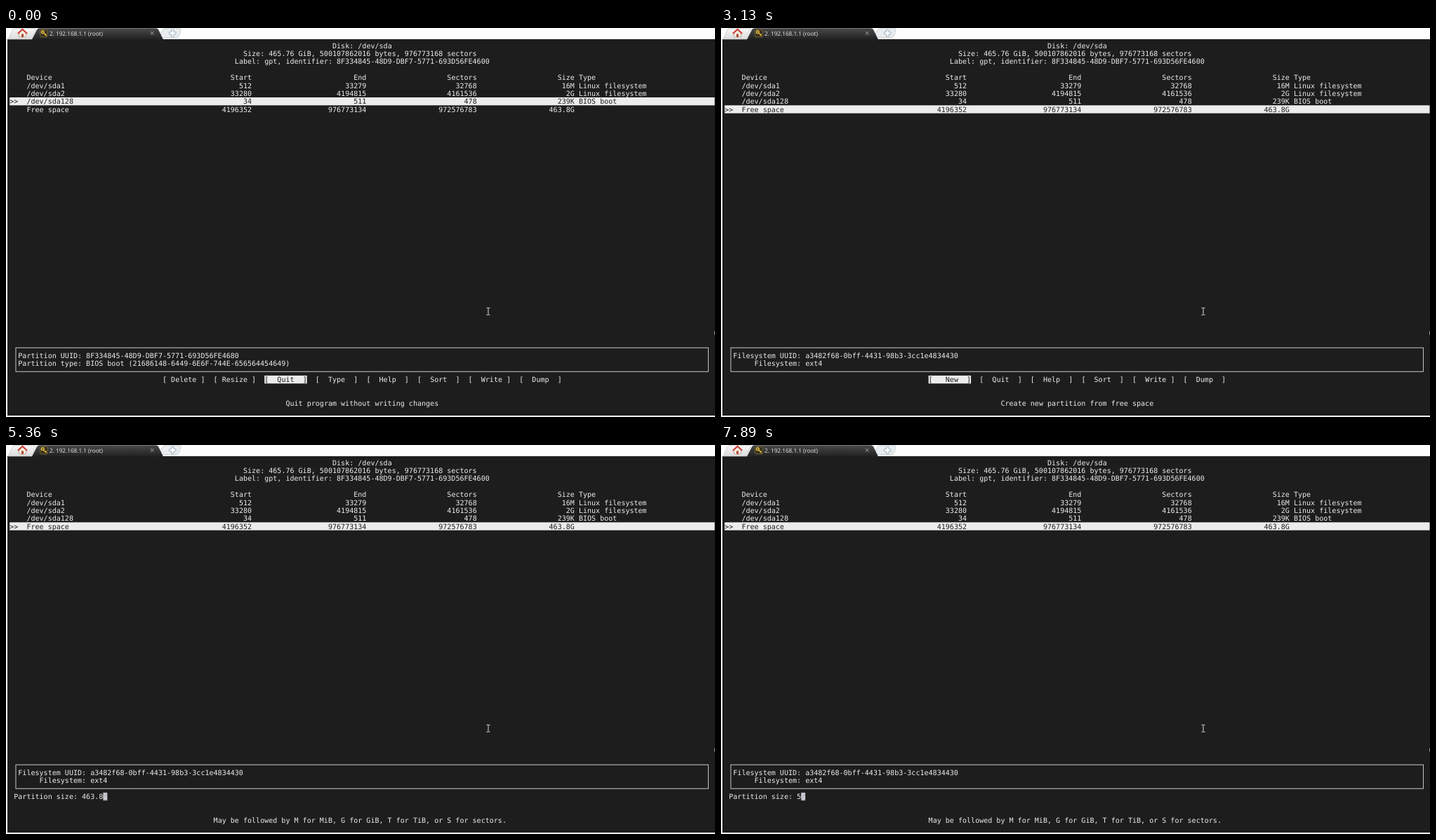
An HTML page that plays this animation: 1010 by 555 pixels, repeating every 8000 ms.

```html
<!DOCTYPE html>
<html lang="en">
<head>
<meta charset="utf-8">
<title>Disk partitioning</title>
<style>
  html, body { margin: 0; width: 100%; height: 100%; overflow: hidden; background: #fdfdfd; }
  svg { display: block; }
  #term text {
    font: 10.05px "DejaVu Sans Mono", monospace;
    white-space: pre;
    text-rendering: geometricPrecision;
  }
</style>
</head>
<body>
<svg width="1010" height="555" viewBox="0 0 1010 555">
  <defs>
    <linearGradient id="dark" x2="0" y2="1">
      <stop offset="0" stop-color="#4a4a4a"/>
      <stop offset="1" stop-color="#202020"/>
    </linearGradient>
    <linearGradient id="light" x2="0" y2="1">
      <stop offset="0" stop-color="#f6f6f6"/>
      <stop offset="1" stop-color="#dcdcdc"/>
    </linearGradient>
  </defs>

  <rect x="2" y="16" width="1008" height="537" fill="#1d1d1d"/>

  <g id="tabs">
    <path d="M3 16L9 3Q10 .5 13 .5H40Q43 .5 42 3L37 16Z" fill="url(#light)" stroke="#c4c4c4" stroke-width=".7"/>
    <path d="M18.5 7.5V13H28.5V7.5L23.5 3Z" fill="#f4ece4" stroke="#a08878" stroke-width=".6"/>
    <path d="M16.8 8L23.5 1.8L30.2 8" fill="none" stroke="#cf3a2c" stroke-width="1.9"/>
    <rect x="22" y="8.5" width="3" height="4.5" fill="#b0492f"/>

    <path d="M217 16L223 3Q224 .8 227 .8H246Q250 .8 249 3.5L246.5 11Q245.5 13.5 242 13.5H226Z" fill="#e9edf0" stroke="#b9c0c5" stroke-width=".7"/>
    <path d="M235.5 3H239V5.8H242V9H239V12H235.5V9H232.5V5.8H235.5Z" fill="#fff" stroke="#8fa3b0" stroke-width=".8"/>

    <path d="M37 16.5L44 2.5Q45.2 .3 48 .3H213Q216 .3 217.2 2.5L224 16.5Z" fill="url(#dark)"/>
    <rect x="48.8" y="2.5" width="10.4" height="10.4" rx="1" fill="#3a3320" stroke="#8a7434" stroke-width=".7"/>
    <circle cx="52.3" cy="5.8" r="1.8" fill="none" stroke="#f0c444" stroke-width="1.4"/>
    <path d="M53.6 7.1L57.6 11.2M56 9.6L57.3 8.5" fill="none" stroke="#f0c444" stroke-width="1.3"/>
    <text x="62" y="10.6" font-family="Open Sans, Noto Sans, sans-serif" font-size="8.2" fill="#ececec" text-rendering="geometricPrecision">2. 192.168.1.1 (root)</text>
    <path d="M205.8 5L210.6 9.8M210.6 5L205.8 9.8" stroke="#b4b4b4" stroke-width=".9"/>
  </g>

  <g id="term"></g>

  <path d="M684.5 399.3H686.3L687 400L687.7 399.3H689.5M687 400V408.7M684.5 409.4H686.3L687 408.7L687.7 409.4H689.5" fill="none" stroke="#f0f0f0" stroke-width=".9"/>
  <path d="M1010 431Q1008.4 435 1010 439Z" fill="#e4e4e4"/>
</svg>
<script>
const LOOP = 8000;
const CW = 6.05, RH = 11.34, X0 = 5.2, Y0 = 19.6;
const FG = '#ececec', BG = '#1d1d1d', CURSOR = '#b4b4c0';
const term = document.getElementById('term');

const colX = c => X0 + c * CW;
const rowY = r => Y0 + r * RH;

const put = (row, col, str, fill = FG) =>
  `<text x="${colX(col).toFixed(2)}" y="${(rowY(row) + 9.2).toFixed(2)}" fill="${fill}">${str.replace(/>/g, '&gt;')}</text>`;

const block = (row, col, len, fill = FG) =>
  `<rect x="${colX(col).toFixed(2)}" y="${rowY(row).toFixed(2)}" width="${(len * CW).toFixed(2)}" height="${RH}" fill="${fill}"/>`;

const titles = [
  [76, 'Disk: /dev/sda'],
  [55, 'Size: 465.76 GiB, 500107862016 bytes, 976773168 sectors'],
  [53, 'Label: gpt, identifier: 8F334845-48D9-DBF7-5771-693D56FE4600']
];

const table = [
  ['Device', 'Start', 'End', 'Sectors', 'Size', 'Type'],
  ['/dev/sda1', '512', '33279', '32768', '16M', 'Linux filesystem'],
  ['/dev/sda2', '33280', '4194815', '4161536', '2G', 'Linux filesystem'],
  ['/dev/sda128', '34', '511', '478', '239K', 'BIOS boot'],
  ['Free space', '4196352', '976773134', '972576783', '463.8G', '']
];
const rightEdges = [57, 84, 110, 133];

const bootView = {
  line: 3,
  info: ['Partition UUID: 8F334845-48D9-DBF7-5771-693D56FE4680',
         'Partition type: BIOS boot (21686148-6449-6E6F-744E-656564454649)'],
  menu: ['Delete', 'Resize', ' Quit ', ' Type ', ' Help ', ' Sort ', ' Write', ' Dump '],
  menuCol: 36, pick: 2,
  hint: [65, 'Quit program without writing changes']
};
const freeView = {
  line: 4,
  info: ['Filesystem UUID: a3482f68-0bff-4431-98b3-3cc1e4834430',
         '     Filesystem: ext4'],
  menu: ['  New ', ' Quit ', ' Help ', ' Sort ', ' Write', ' Dump '],
  menuCol: 48, pick: 0,
  hint: [65, 'Create new partition from free space']
};
// Size prompt: typed value and caret position within it
const prompt = (value, caret) => ({
  ...freeView, menu: null, value, caret,
  hint: [48, 'May be followed by M for MiB, G for GiB, T for TiB, or S for sectors.']
});

const timeline = [
  [0, bootView],
  [500, freeView],
  [2580, bootView],
  [3130, freeView],
  [4060, prompt('463.8G', 6)],
  [5360, prompt('463.8G', 5)],
  [5920, prompt('463.G', 4)],
  [6045, prompt('463G', 3)],
  [6170, prompt('46G', 2)],
  [6340, prompt('4G', 1)],
  [6460, prompt('G', 0)],
  [7890, prompt('5G', 1)]
];

function tableRow(cells, i, selected) {
  const row = 4 + i, ink = selected ? BG : FG;
  let out = selected ? block(row, 0, 166) + put(row, 0, '>>', ink) : '';
  out += put(row, 4, cells[0], ink);
  rightEdges.forEach((edge, k) => {
    const s = cells[k + 1];
    out += put(row, edge - s.length, s, ink);
  });
  return out + put(row, 134, cells[5], ink);
}

function menuBar(v) {
  return v.menu.map((label, i) => {
    const col = v.menuCol + 12 * i, on = i === v.pick;
    return (on ? block(42, col, 10) : '') + put(42, col, `[ ${label} ]`, on ? BG : FG);
  }).join('');
}

function promptLine(v) {
  const col = 17 + v.caret;
  return put(42, 1, 'Partition size: ' + v.value.slice(0, v.caret)) +
    block(42, col, 1, CURSOR) + put(42, col, v.value.slice(v.caret));
}

function infoBox(v) {
  const x = colX(1.45), y = rowY(38.5);
  return `<rect x="${x}" y="${y}" width="${colX(164.5) - x}" height="${3 * RH}" fill="none" stroke="#dcdcdc" stroke-width=".9"/>` +
    v.info.map((s, i) => put(39 + i, 2, s)).join('');
}

function render(v) {
  term.innerHTML =
    titles.map(([col, s], i) => put(i, col, s)).join('') +
    table.map((cells, i) => tableRow(cells, i, i === v.line)).join('') +
    infoBox(v) +
    (v.menu ? menuBar(v) : promptLine(v)) +
    put(45, ...v.hint);
}

let shown;
function frame() {
  const t = performance.now() % LOOP;
  const view = timeline.filter(([at]) => at <= t).pop()[1];
  if (view !== shown) render(shown = view);
  requestAnimationFrame(frame);
}
frame();
</script>
</body>
</html>
```
